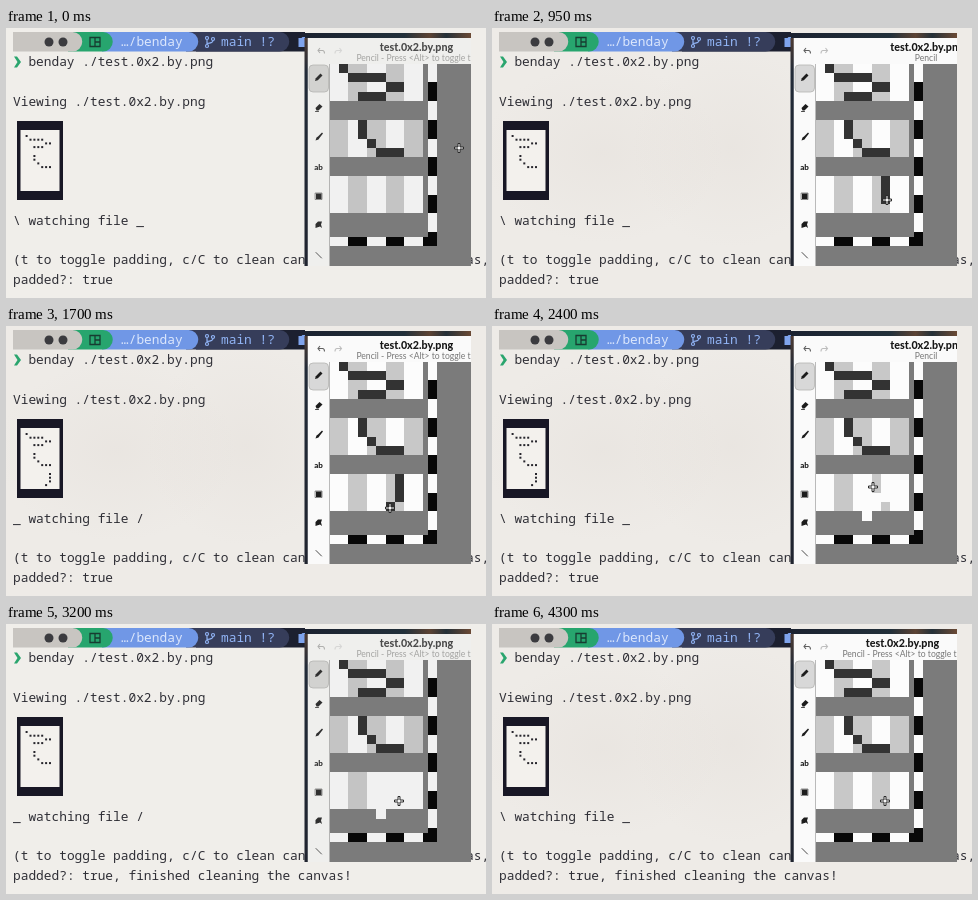
Animation of 480x270 px, one loop 4.35 s. Source, as an HTML page:

```html
<!DOCTYPE html>
<html lang="en">
<head>
<meta charset="utf-8">
<title>Terminal preview</title>
<style>
html, body { margin: 0; width: 100%; height: 100%; overflow: hidden; }
svg {
  display: block; width: 100vw; height: 100vh;
  --paper: #f0eeea; --head: #efefed; --title: #4b4b4b; --sub: #a3a3a1;
  --nav: #b0b0ae; --icon: #303030; --light: #f1f1f1; --mid: #c4c4c4; --pick: #d2d2d0;
}
svg.focus {
  --paper: #eeebe7; --head: #fafafa; --title: #171717; --sub: #777;
  --nav: #606060; --icon: #1c1c1c; --light: #fcfcfc; --mid: #c8c8c8; --pick: #d8d8d8;
}
#haze { display: none; }
.focus #haze { display: inline; }
.term { font: 500 12.83px "Noto Sans Mono", "DejaVu Sans Mono", monospace; fill: #2f2f36; white-space: pre; }
.title { font: 800 10.7px Lato, sans-serif; fill: var(--title); text-anchor: middle; }
.sub { font: 8.6px Lato, sans-serif; fill: var(--sub); text-anchor: middle; }
.ab { font: 800 8px Lato, sans-serif; fill: var(--icon); text-anchor: middle; }
.line { fill: none; stroke: var(--icon); stroke-linecap: round; }
.tool { fill: var(--icon); }
#canvas, #ink { shape-rendering: crispEdges; }
</style>
</head>
<body>
<svg id="stage" viewBox="0 0 480 270" preserveAspectRatio="none">
  <defs>
    <linearGradient id="wall" x2="1" y2="0">
      <stop offset="0" stop-color="#1b2230"/><stop offset=".6" stop-color="#22303a"/>
      <stop offset=".75" stop-color="#5c4334"/><stop offset=".85" stop-color="#243038"/>
      <stop offset="1" stop-color="#6b4a35"/>
    </linearGradient>
    <linearGradient id="edge" x2="0" y2="1">
      <stop offset="0" stop-color="#4d3b33"/><stop offset=".15" stop-color="#222b38"/>
      <stop offset="1" stop-color="#20242f"/>
    </linearGradient>
    <radialGradient id="glow">
      <stop offset="0" stop-color="#d8d0c9" stop-opacity=".2"/><stop offset="1" stop-color="#d8d0c9" stop-opacity="0"/>
    </radialGradient>
    <clipPath id="win"><rect x="301.500" y="10" width="163.500" height="228"/></clipPath>
  </defs>

  <rect width="480" height="270" fill="var(--paper)"/>
  <g id="haze" fill="url(#glow)">
    <ellipse cx="110" cy="125" rx="120" ry="90"/>
    <ellipse cx="240" cy="120" rx="100" ry="100"/>
  </g>

  <g id="prompt">
    <rect x="190" y="4" width="109" height="19.500" fill="#1c2030"/>
    <path d="M180 4h93.500a9.750 9.750 0 0 1 0 19.500H180z" fill="#363d5a"/>
    <path d="M96 4h86.500a9.750 9.750 0 0 1 0 19.500H96z" fill="#7097e6"/>
    <path d="M62 4h35a9.750 9.750 0 0 1 0 19.500H62z" fill="#27a56e"/>
    <path d="M7 4h59.500a9.750 9.750 0 0 1 0 19.500H7z" fill="#c8c5c1"/>
    <circle cx="43" cy="14" r="4.500" fill="#3b3b3f"/>
    <circle cx="57" cy="14" r="4.500" fill="#3b3b3f"/>
    <path d="M84 9.500h10v9H84zM89 9.500v9M89 14h5" fill="none" stroke="#173c31" stroke-width="1.300"/>
    <g fill="none" stroke="#91b4f5" stroke-width="1.200">
      <circle cx="201" cy="10" r="1.500"/><circle cx="201" cy="18" r="1.500"/><circle cx="207" cy="11" r="1.500"/>
      <path d="M201 11.500v5M207 12.500q0 2.500-6 3"/>
    </g>
    <path d="M292.500 10h3l1-1h2.500v10h-6.500z" fill="#7fa4ed"/>
  </g>
  <g class="term">
    <text x="115" y="18" style="fill:#dce7fc">…/benday</text>
    <text x="215" y="18" style="fill:#91b4f5">main !?</text>
    <path d="M8 28.500h3l4 5.500-4 5.500H8l3.500-5.500z" fill="#2aa56e"/>
    <text x="22.400" y="38">benday ./test.0x2.by.png</text>
    <text x="7" y="77.500">Viewing ./test.0x2.by.png</text>
    <text id="spin" x="7" y="196.500"></text>
    <text x="7" y="236">(t to toggle padding, c/C to clean can</text>
    <text x="460" y="236">as,</text>
    <text id="status" x="7" y="256"></text>
  </g>

  <g id="preview">
    <rect x="11" y="93" width="46" height="79" fill="#181725"/>
    <rect x="14.500" y="102" width="39" height="61" fill="#f3f1ed"/>
  </g>

  <rect x="299" y="5" width="166" height="6" fill="url(#wall)"/>
  <rect x="298.500" y="10" width="4" height="228" fill="url(#edge)"/>
  <g clip-path="url(#win)">
    <rect x="301.500" y="10" width="164" height="228" fill="var(--head)"/>
    <g fill="none" stroke="var(--nav)" stroke-width="1.100">
      <path d="M314 20l-2 2.500 2 2.500M312 22.500h4.500q2 0 2 3"/>
      <path d="M333.500 20l2 2.500-2 2.500M335.500 22.500h-4.500q-2 0-2 3" opacity=".4"/>
    </g>
    <text id="title" class="title" y="22.500">test.0x2.by.png</text>
    <text id="sub" class="sub" y="33"></text>

    <rect x="303" y="37" width="19.500" height="27" rx="4" fill="var(--pick)" stroke="#b4b4b2" stroke-width=".8"/>
    <path class="tool" d="M309 53l.8-2.800 4.700-4.700 2 2-4.700 4.700z"/>
    <path class="tool" d="M309.500 80l4-4 3 2.500-4 4h-2z"/>
    <path class="line" d="M309.500 83.500h3" stroke-width=".8"/>
    <path class="tool" d="M309.500 112.500l1-3 1.500-1 4-4 1 1-3.500 4.500-1 1.500z"/>
    <text class="ab" x="312.500" y="141.500">ab</text>
    <rect class="tool" x="310" y="165.500" width="5.500" height="5.500"/>
    <path class="line" d="M309.500 165h6.500v6.500h-6.500z" stroke-width=".5"/>
    <path class="tool" d="M309.500 200v-4l2.500-2.500h4l-1 3 1 3.500-2-1.500z"/>
    <path class="line" d="M310 224.500l5.500 5.500" stroke-width=".8"/>

    <rect x="323.500" y="36" width="142" height="202" fill="#7b7b7b"/>
    <g id="canvas"></g>
    <g id="ink"></g>
  </g>
  <path id="pointer" d="M-1-4.500h2v3.500h3.500v2H1v3.500h-2V1h-3.500v-2H-1z" fill="#f8f8f8" stroke="#2a2a2a" stroke-width="1"/>
</svg>
<script>
const LOOP = 4350, STEP = 50, CELL = 9.35, LEFT = 323.5, TOP = 35.7;
const $ = id => document.getElementById(id);

function rect(parent, x, y, w, h, fill) {
  const r = document.createElementNS('http://www.w3.org/2000/svg', 'rect');
  for (const [k, v] of Object.entries({ x, y, width: w, height: h, fill })) r.setAttribute(k, v);
  return parent.appendChild(r);
}
const cells = (parent, col, row, w, h, fill) =>
  rect(parent, LEFT + col * CELL, TOP + row * CELL, w * CELL, h * CELL, fill);
const dot = (col, row) =>
  rect($('preview'), 15.7 + col * 3.9, 107 + (row % 6) * 3.7 + Math.floor(row / 6) * 20, 2, 2, '#26252c');
const show = (el, on) => { el.style.display = on ? '' : 'none'; };

// Panels with alternating stripes and a checkered border
for (let panel = 0; panel < 3; panel++)
  for (let i = 0; i < 5; i++)
    cells($('canvas'), i * 2, panel * 6, 2, 4, (i + panel) % 2 ? 'var(--mid)' : 'var(--light)');
for (let i = 0; i < 10; i++)
  rect($('canvas'), 421.5, TOP + i * 2 * CELL, 9.5, Math.min(2 * CELL, 218 - TOP - i * 2 * CELL),
    i % 2 ? '#080808' : 'var(--light)');
for (let i = 0; i < 6; i++)
  rect($('canvas'), LEFT + i * 2 * CELL, 208.7, i < 5 ? 2 * CELL : 14, 9.3, i % 2 ? '#080808' : 'var(--light)');

// Finished strokes: column, row, length
const strokes = [[1, 0, 1], [2, 1, 4], [6, 2, 2], [3, 3, 3], [3, 6, 1], [3, 7, 1], [4, 8, 1], [5, 9, 3]];
for (const [col, row, n] of strokes) {
  cells($('ink'), col, row, n, 1, '#333');
  for (let i = 0; i < n; i++) dot(col + i, row);
}

// Column, row, time of each drawn or erased cell
const drawn = [[7, 12, 750], [7, 13, 850], [7, 14, 950], [6, 15, 1150]];
const erased = [[7, 12, 2000], [7, 13, 2050], [7, 14, 2150], [6, 15, 2200], [5, 16, 2300],
  [6, 14, 2350], [6, 13, 2450], [6, 12, 2500], [7, 15, 2700]];
const RESTORE = 3800;
const paint = (list, fill) => list.map(([col, row, from]) => ({ el: cells($('ink'), col, row, 1, 1, fill), from }));
const marks = [...paint(drawn, '#333'), ...paint(erased, 'var(--light)')];
const newDots = drawn.map(([col, row]) => dot(col, row));

// Time, x, y
const path = [[0, 453, 120], [600, 394, 152], [700, 394, 152], [950, 395, 172], [1150, 384, 182],
  [1900, 384, 182], [2000, 393, 152], [2150, 394, 170], [2220, 385, 180], [2290, 375, 190],
  [2400, 381, 161], [2500, 385, 152], [2700, 394, 180], [2850, 393, 177], [LOOP, 393, 177]];

function pointAt(t) {
  const i = path.findIndex(p => p[0] > t);
  const [t0, x0, y0] = path[i - 1], [t1, x1, y1] = path[i];
  const k = (t - t0) / (t1 - t0);
  return [x0 + (x1 - x0) * k, y0 + (y1 - y0) * k];
}
const within = (t, ...spans) => spans.some(([from, to]) => t >= from && t < to);

function render(time) {
  const t = Math.floor(time % LOOP / STEP) * STEP;
  const drawing = within(t, [750, 1350], [1950, 2800]);
  const mid = drawing ? 434 : 409.5;
  $('stage').classList.toggle('focus', within(t, [750, 3000], [RESTORE, LOOP]));
  $('title').setAttribute('x', mid + 1);
  $('sub').setAttribute('x', mid);
  $('sub').textContent = drawing ? 'Pencil' : 'Pencil - Press <Alt> to toggle t..';
  $('spin').textContent = within(t, [1050, 2050], [3050, 4050]) ? '_ watching file /' : '\\ watching file _';
  $('status').textContent = 'padded?: true' + (t >= 3050 ? ', finished cleaning the canvas!' : '');
  for (const { el, from } of marks) show(el, within(t, [from, RESTORE]));
  for (const el of newDots) show(el, within(t, [1500, 2900]));
  $('pointer').setAttribute('transform', `translate(${pointAt(t)})`);
}

const start = performance.now();
function tick() {
  render(performance.now() - start);
  requestAnimationFrame(tick);
}
tick();
</script>
</body>
</html>
```
